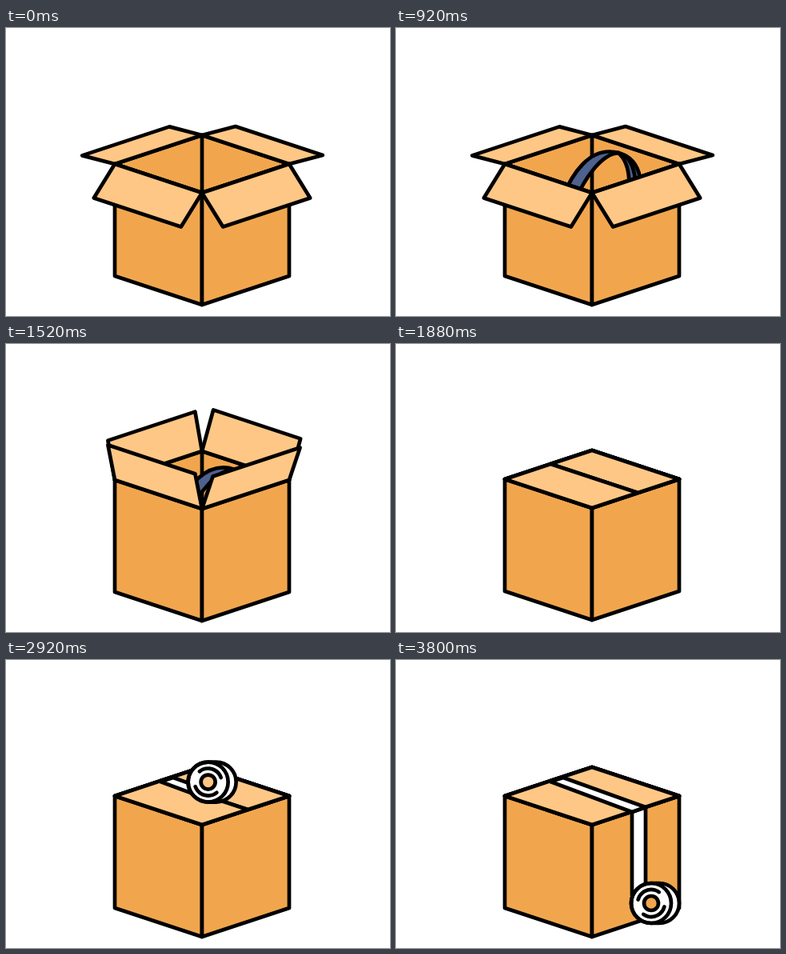
An HTML page with a canvas that plays this animation: 480x360 px, repeating every 3.84 s.

```html
<!DOCTYPE html>
<html lang="en">
<head>
<meta charset="utf-8">
<title>Packing a box</title>
<style>
  html, body { margin: 0; width: 100%; height: 100%; overflow: hidden; background: #fff; }
  canvas { display: block; width: 480px; height: 360px; }
</style>
</head>
<body>
<canvas id="stage"></canvas>
<script>
const LOOP = 3840, STEP = 40;
const INK = '#000', SIDE = '#f1a64e', LID = '#fec785', BLUE = '#4e618f', WHITE = '#fff';

const canvas = document.getElementById('stage');
const ratio = window.devicePixelRatio || 1;
canvas.width = 480 * ratio;
canvas.height = 360 * ratio;
const ctx = canvas.getContext('2d');

// Corners of the box: top rim, then the lower edge.
const back = [245, 134], left = [136, 170], front = [245, 206], right = [354, 170];
const lowLeft = [136, 310], lowFront = [245, 346], lowRight = [354, 310];

// Keyed values: time, value, time, value, ...
const HEAD_Y = [320, -165, 640, 0, 920, 144.5];
const HEAD_X = [720, 0, 960, 29];
const HEAD_TURN = [720, 0, 960, 18];
const FRONT_ANGLE = [1000, -52.5, 1240, -12, 1400, 42, 1840, 180];
const FRONT_SIZE = [1000, .79, 1240, .65, 1400, .83, 1840, 1];
const BACK_ANGLE = [1080, -4, 1240, 8, 1400, 42, 1840, 180];
const BACK_LEFT_SIZE = [1080, .75, 1240, .67, 1400, .83, 1840, 1];
const BACK_RIGHT_SIZE = [1080, .77, 1240, .75, 1400, .88, 1840, 1];
const RIGHT_LAG = 20;
const ROLL_SCALE = [2200, 0, 2480, 1.15, 2600, 1];
const ROLL_X = [2600, 199, 3280, 313, 3800, 319];
const ROLL_Y = [2600, 129, 3280, 179, 3800, 304];
const ROLL_TURN = [2600, 0, 3280, 225, 3800, 430];
const TAPE = [2600, 0, 3280, 1];

function at(keys, t) {
  if (t <= keys[0]) return keys[1];
  for (let i = 2; i < keys.length; i += 2) {
    if (t <= keys[i]) {
      const p = (t - keys[i - 2]) / (keys[i] - keys[i - 2]);
      return keys[i - 1] + (keys[i + 1] - keys[i - 1]) * p;
    }
  }
  return keys[keys.length - 1];
}

const rad = deg => deg * Math.PI / 180;
const shift = ([x, y], [dx, dy]) => [x + dx, y + dy];

function paint(path, fill) {
  if (fill) {
    ctx.fillStyle = fill;
    ctx.fill(path, 'evenodd');
  }
  ctx.stroke(path);
}

function poly(fill, ...pts) {
  const path = new Path2D();
  pts.forEach(([x, y]) => path.lineTo(x, y));
  path.closePath();
  paint(path, fill);
}

function oval(fill, x, y, rx, ry, from = 0, to = 360) {
  const path = new Path2D();
  path.ellipse(x, y, rx, ry, 0, rad(from), rad(to));
  paint(path, fill);
}

// A flap swings about the rim edge a-b; (ox, oy) points outwards.
function flap(a, b, ox, oy, angle, size) {
  const c = Math.cos(rad(angle)) * size, s = Math.sin(rad(angle)) * size;
  const v = [54.5 * ox * c, 18 * oy * c - 54 * s];
  poly(LID, a, b, shift(b, v), shift(a, v));
}

const leftBand = new Path2D('M190 84C194 52 206 10 244 10C224 16 210 52 207 84Z');
const rightBand = new Path2D('M243 10C274 10 290 42 285 94L270 94C274 52 262 18 243 10Z');
const bandLine = new Path2D('M252 11C270 20 283 52 278 94');

function headphones(t) {
  ctx.save();
  ctx.translate(243 + at(HEAD_X, t), 50 + at(HEAD_Y, t));
  ctx.rotate(rad(at(HEAD_TURN, t)));
  ctx.translate(-243, -50);
  paint(leftBand, BLUE);
  paint(rightBand, BLUE);
  paint(bandLine);
  oval(BLUE, 192, 120, 25, 37);
  oval(BLUE, 205, 120, 27, 37.5);
  oval(BLUE, 205, 120.5, 11.5, 20);
  oval(BLUE, 264, 127.5, 26, 36.5);
  oval(BLUE, 275.5, 128.5, 27, 37);
  oval(null, 281, 129.5, 22, 28, 90, 275);
  ctx.restore();
}

function box(t) {
  const lag = t - RIGHT_LAG;
  const angle = at(FRONT_ANGLE, t), lagAngle = at(FRONT_ANGLE, lag);
  const closed = Math.max(0, (angle - 90) / 90) * .05;
  const backRight = () => flap(back, right, 1, -1,
    at(BACK_ANGLE, lag), at(BACK_RIGHT_SIZE, lag) - closed);
  const backFlaps = () => {
    flap(left, back, -1, -1, at(BACK_ANGLE, t), at(BACK_LEFT_SIZE, t));
    backRight();
  };

  poly(SIDE, back, right, front, left);
  poly(null, back, front);
  if (angle < 90) backFlaps();
  if (t >= 320 && t < 1840) headphones(t);
  if (angle >= 90) backFlaps();
  poly(SIDE, left, front, lowFront, lowLeft);
  poly(SIDE, front, right, lowRight, lowFront);
  flap(front, right, 1, 1, lagAngle, at(FRONT_SIZE, lag));
  if (angle > 140) backRight();
  flap(left, front, -1, 1, angle, at(FRONT_SIZE, t) + closed);
}

function tape(t) {
  const p = at(TAPE, t), end = at(ROLL_Y, t);
  if (t > 3280) {
    poly(WHITE, [295, 190], [312, 184],
      [312, Math.max(184, end - 14)], [295, Math.max(190, end - 10)]);
  }
  if (p > 0) {
    poly(WHITE, [193, 152], [209, 147],
      [209 + 103 * p, 147 + 37 * p], [193 + 102 * p, 152 + 38 * p]);
  }
}

// The roll's core is open, so the box shows through it.
const rollBody = new Path2D('M0-25H10A25 25 0 0 1 10 25H0A25 25 0 0 1 0-25Z' +
  'M9 0A9 9 0 0 1-9 0A9 9 0 0 1 9 0Z');

function roll(t) {
  const k = at(ROLL_SCALE, t);
  if (k <= 0) return;
  ctx.save();
  ctx.translate(at(ROLL_X, t), at(ROLL_Y, t));
  ctx.scale(k, k);
  paint(rollBody, WHITE);
  oval(null, 0, 0, 25, 25);
  ctx.rotate(rad(at(ROLL_TURN, t)));
  oval(null, 0, 0, 17, 17, 125, 235);
  oval(null, 0, 0, 17, 17, -55, 55);
  ctx.restore();
}

function draw(t) {
  const lift = t >= 1800 && t < 2040 ? -1 : 0;
  ctx.setTransform(ratio, 0, 0, ratio, 0, 0);
  ctx.fillStyle = WHITE;
  ctx.fillRect(0, 0, 480, 360);
  ctx.translate(0, lift);
  ctx.strokeStyle = INK;
  ctx.lineWidth = 4.7;
  ctx.lineJoin = ctx.lineCap = 'round';
  box(t);
  tape(t);
  roll(t);
}

const start = performance.now();
function tick() {
  const t = (performance.now() - start) % LOOP;
  draw(Math.floor(t / STEP) * STEP);
  requestAnimationFrame(tick);
}
tick();
</script>
</body>
</html>
```
